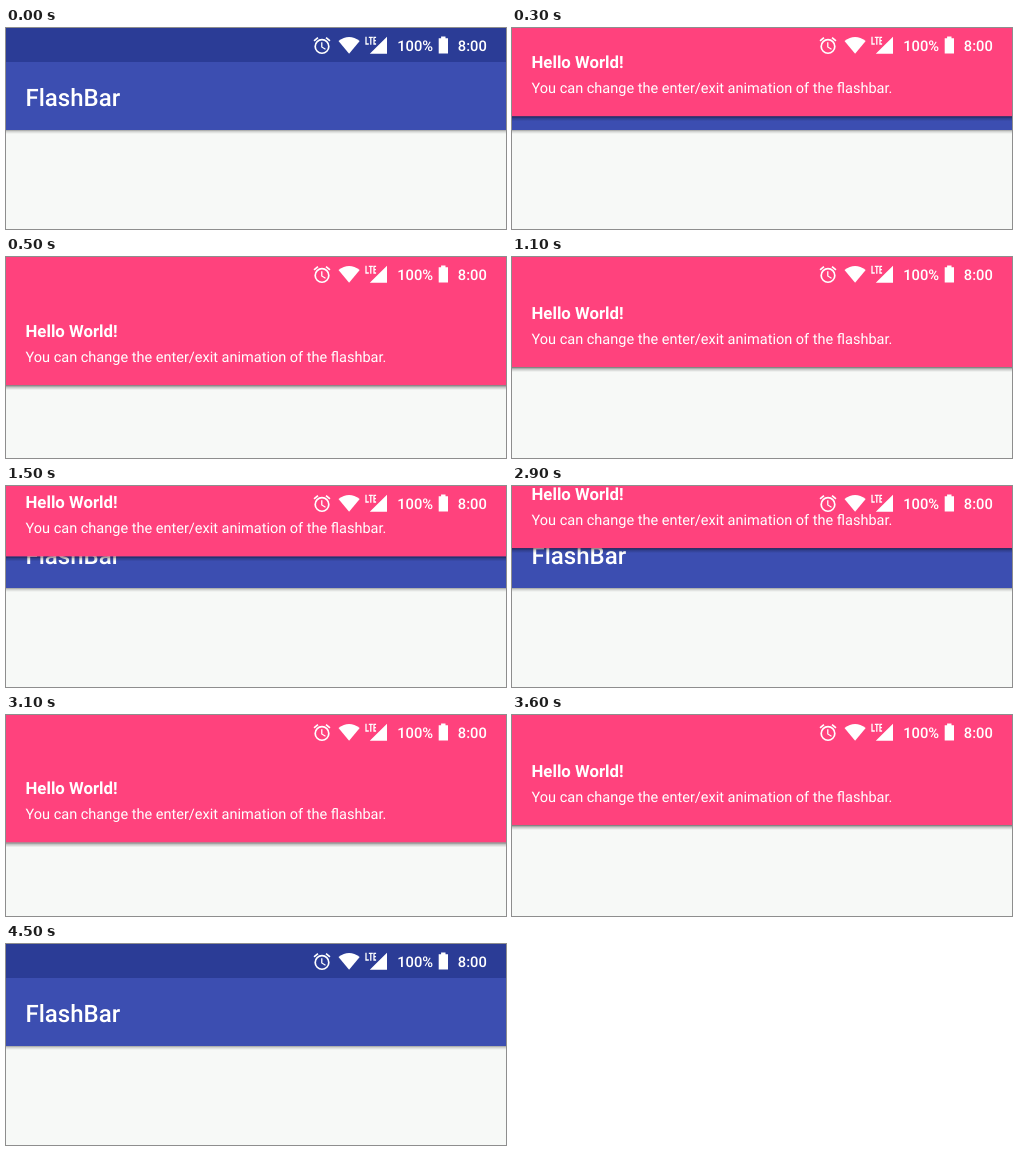
Recreate the animation shown at these times as an HTML page. Size 500x201 px, loop 5.2 s.

```html
<!DOCTYPE html>
<html lang="en">
<head>
<meta charset="utf-8">
<title>FlashBar</title>
<style>
  html, body { margin: 0; width: 100%; height: 100%; overflow: hidden; background: #f7f9f7; }
  svg { display: block; width: 500px; height: 201px; font-family: Roboto, sans-serif; fill: #fff; }
  text { text-rendering: geometricPrecision; }
</style>
</head>
<body>
<svg viewBox="0 0 500 201">
  <defs>
    <linearGradient id="shade" x2="0" y2="1">
      <stop offset="0" stop-color="#000" stop-opacity=".55"/>
      <stop offset=".4" stop-color="#000" stop-opacity=".22"/>
      <stop offset="1" stop-color="#000" stop-opacity="0"/>
    </linearGradient>
  </defs>

  <rect width="500" height="201" fill="#f7f9f7"/>
  <rect y="102" width="500" height="4" fill="url(#shade)" opacity=".65"/>
  <rect width="500" height="102" fill="#3c4eb1"/>
  <rect width="500" height="34" fill="#2b3c96"/>
  <text x="19.5" y="77.5" font-size="24" font-weight="500">FlashBar</text>

  <g id="bar">
    <rect y="110" width="500" height="5" fill="url(#shade)"/>
    <rect y="-60" width="500" height="170" fill="#ff427d"/>
    <text x="19.5" y="61.5" font-size="16.8" font-weight="700">Hello World!</text>
    <text x="19.5" y="87" font-size="14.52">You can change the enter/exit animation of the flashbar.</text>
  </g>

  <g id="status">
    <path transform="translate(305.8 7.4) scale(.85)" fill-rule="evenodd" d="M22 5.72l-4.6-3.86-1.29 1.53 4.6 3.86zM7.88 3.39L6.6 1.86 2 5.71l1.29 1.53zM12.5 8H11v6l4.75 2.85.75-1.23-4-2.37zM12 4a9 9 0 0 0 0 18a9 9 0 0 0 0-18zm0 16a7 7 0 0 1 0-14a7 7 0 0 1 0 14z"/>
    <path d="M360 8.7v7.3h2.8M362.8 9.4h4M364.8 9.4v7.3M370.1 9.4h-2.1v6.6h2.1M368 12.7h1.9" fill="none" stroke="#fff" stroke-width="1.3"/>
    <path d="M332.5 12.9Q343.1 4.9 353.7 12.9L343.1 25.8Z"/>
    <path d="M381 8.7v17h-17.2l7.8-7.7Z"/>
    <path d="M435.1 8.5h4.4v1.8h2.5v15.3h-9.3v-15.3h2.4Z"/>
    <g font-size="14.7" font-weight="500">
      <text x="391.2" y="22.8">100%</text>
      <text x="451.8" y="22.8">8:00</text>
    </g>
  </g>
</svg>
<script>
  const LOOP = 5200, STEP = 100, TRAVEL = 138;
  const ENTER = 600, EXIT = 250;
  const shows = [
    { enter: 155, exit: 1410 },
    { enter: 2800, exit: 4310 }
  ];
  const bar = document.getElementById("bar");

  const overshoot = p => { const q = p - 1; return q * q * (3 * q + 2) + 1; };
  const easeInOut = p => (1 - Math.cos(Math.PI * p)) / 2;
  const progress = (t, start, length) => Math.min(1, Math.max(0, (t - start) / length));

  // 0 is hidden above the stage, 1 is the resting place
  function reveal(t) {
    const show = shows.find(s => t > s.enter && t < s.exit + EXIT);
    if (!show) return 0;
    if (t > show.exit) return 1 - easeInOut(progress(t, show.exit, EXIT));
    return overshoot(progress(t, show.enter, ENTER));
  }

  function draw() {
    const t = Math.floor((performance.now() % LOOP) / STEP) * STEP;
    const shown = reveal(t);
    bar.setAttribute("transform", `translate(0 ${((shown - 1) * TRAVEL).toFixed(2)})`);
    bar.setAttribute("visibility", shown > 0 ? "visible" : "hidden");
    requestAnimationFrame(draw);
  }
  draw();
</script>
</body>
</html>
```
